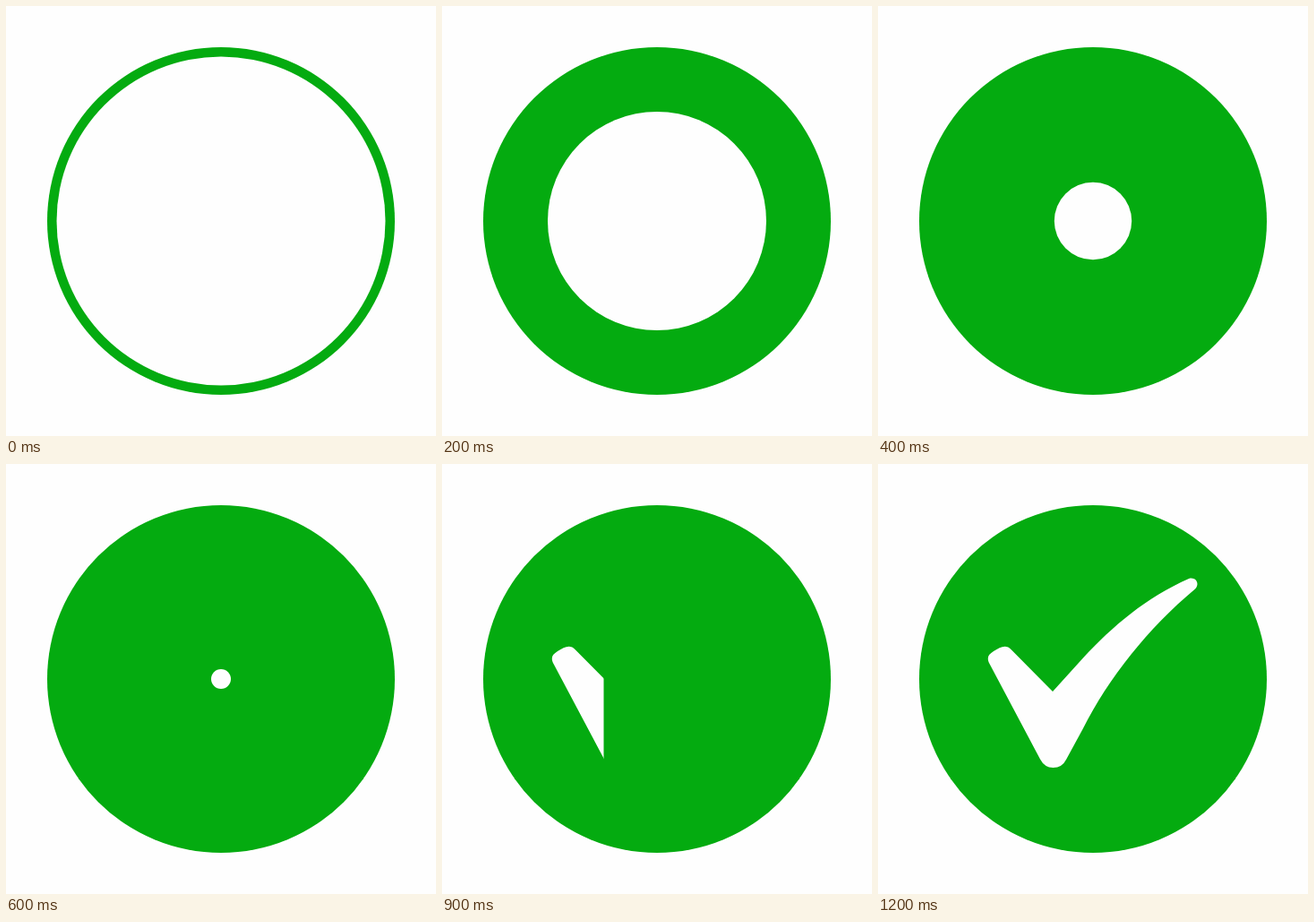
These frames come from a looping animation (480 by 480 pixels, 1300 ms). An HTML page:

```html
<!DOCTYPE html>
<html lang="en">
<head>
<meta charset="utf-8">
<title>Check mark</title>
<style>
  html, body { margin: 0; width: 100%; height: 100%; overflow: hidden; background: #fefefe; }
  svg { display: block; width: 100vw; height: 100vh; }
</style>
</head>
<body>
<svg viewBox="0 0 480 480">
  <defs>
    <clipPath id="wipe"><rect id="reveal" y="0" width="0" height="480"/></clipPath>
  </defs>
  <circle cx="240" cy="240" r="194" fill="#04ab10"/>
  <circle id="hole" cx="240" cy="240" r="0" fill="#fefefe"/>
  <path clip-path="url(#wipe)" fill="#fefefe" d="M124.5 223 C121 216 123 213 129 209 C137 204 143 201 149 207.500
    L195 254 L228.500 217 C262 181 299 149 347 128 C354 125.500 360 133 354 139.500
    C301 184 258 238 228.500 296 L210 330 Q205.500 339 195.500 339 Q186 339 181 329.500 Z"/>
</svg>
<script>
const STEP = 100, LOOP = 1300, WIPE_START = 800, WIPE_END = 1200;
const holeRadii = [183.5, 159, 122, 81, 43.2, 23, 11];
const hole = document.getElementById('hole');
const reveal = document.getElementById('reveal');

// The right edge of the mark's reveal speeds up as it travels.
function wipeEdge(time) {
  if (time < WIPE_START) return 0;
  if (time >= WIPE_END) return 480;
  const u = (time - WIPE_START) / 200;
  return 141 + 88 * u + 18 * u * (u - 1);
}

function draw(time) {
  const step = Math.floor(time / STEP);
  hole.setAttribute('r', holeRadii[step] ?? 0);
  reveal.setAttribute('width', wipeEdge(step * STEP));
}

const start = performance.now();
function tick() {
  draw((performance.now() - start) % LOOP);
  requestAnimationFrame(tick);
}
tick();
</script>
</body>
</html>
```
